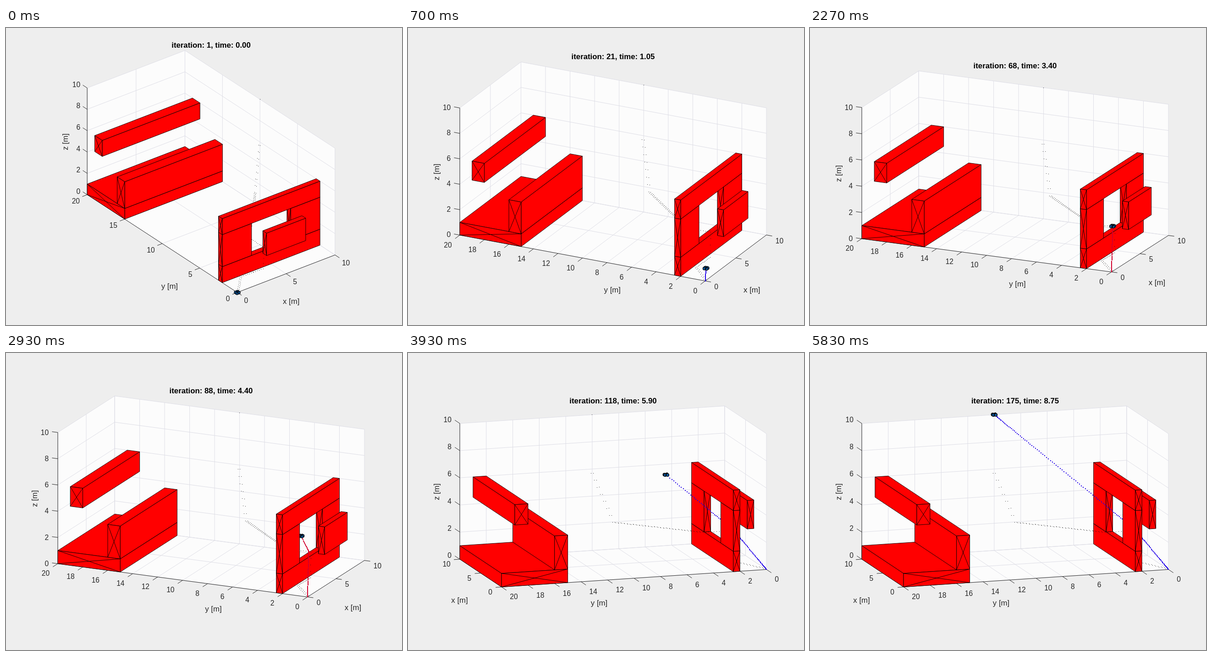
Animation of 864x648 px, one loop 5.86 s. Source, as an HTML page with a canvas:

```html
<!DOCTYPE html>
<html lang="en">
<head>
<meta charset="utf-8">
<title>Flight path</title>
<style>
  html, body { margin: 0; width: 864px; height: 648px; overflow: hidden; background: #eee; }
  canvas { display: block; }
</style>
</head>
<body>
<canvas id="stage" width="864" height="648"></canvas>
<script>
const ctx = document.getElementById('stage').getContext('2d');
const LOOP = 5860;
const FONT = '"Liberation Sans", Arial, sans-serif';
const INK = '#262626';

// step, azimuth, elevation, x label offset, y label offset
const VIEWS = [
  [0, -37.5, 30, 11, 60, 16, 93],
  [15, -37.5, 30, 11, 60, 16, 93],
  [21, -63.5, 22, 35, 69, 65, 69],
  [24, -65.5, 17, 37, 63, 67, 62],
  [91, -65.5, 17, 37, 63, 67, 62],
  [97, -86.5, 16, 66, 0, 90, 50],
  [109, -107.5, 12.1, -46, 59, -76, 54]
];

// x0, x1, y0, y1, z0, z1
const FAR = {
  slab: [0, 10, 15, 20, 0, 1],
  wall: [0, 10, 15, 16, 1, 3.5],
  beam: [0, 10, 18, 19, 4.5, 6]
};
const GATE = [
  [0, 10, 2, 2.5, 0, 1.5],
  [7, 10, 2, 2.5, 1.5, 4.5],
  [0, 3, 2, 2.5, 1.5, 4.5],
  [0, 10, 2, 2.5, 4.5, 6]
];
const PANEL = [3, 7, 0, 0.5, 2.4, 4.5];
const GATE_Y = 2.25;

const START = [0, 0, 0], TURN = [3.4, 1.45, 2.35], GOAL = [10, 10, 10];

// planned route: corner points and the steps leading to each
const ROUTE = [
  [[0, 0, 0], 0], [[1.4, 1.47, 0.26], 8], [[3.8, 1.5, 0.2], 12], [[3.9, 1.5, 2.15], 4],
  [[3.9, 3.54, 2.15], 10], [[8.6, 8.9, 2.28], 30], [[9.95, 10.1, 5.7], 7]
];

const mix = (a, b, u) => a + (b - a) * u;
const mix3 = (a, b, u) => a.map((v, i) => mix(v, b[i], u));
const ease = u => { u = Math.min(1, Math.max(0, u)); return u * u * (3 - 2 * u); };
const range = (end, step) => Array.from({ length: end / step + 1 }, (_, i) => i * step);

const routeDots = [GOAL];
for (let k = 1; k < ROUTE.length; k++) {
  const [to, count] = ROUTE[k], from = ROUTE[k - 1][0];
  for (let i = 0; i < count; i++) {
    const p = mix3(from, to, i / count), q = mix3(from, to, (i + 1) / count);
    routeDots.push([q[0], p[1], q[2]], q);
  }
}

const flight = n => n < 65.7
  ? mix3(START, TURN, ease(n / 63))
  : mix3(TURN, GOAL, ease((n - 65.7) / 108));

function viewAt(n) {
  let i = 0;
  while (i < VIEWS.length - 2 && VIEWS[i + 1][0] <= n) i++;
  const a = VIEWS[i], b = VIEWS[i + 1];
  const u = Math.min(1, (n - a[0]) / (b[0] - a[0]));
  return a.map((v, k) => mix(v, b[k], u));
}

// Orthographic camera that fits the 10 x 20 x 10 volume into the axes area
function camera(az, el) {
  const r = Math.PI / 180;
  const ca = Math.cos(az * r), sa = Math.sin(az * r), ce = Math.cos(el * r), se = Math.sin(el * r);
  const w = 10 * Math.abs(ca) + 20 * Math.abs(sa);
  const h = se * (10 * Math.abs(sa) + 20 * Math.abs(ca)) + 10 * ce;
  const scale = Math.min(669 / w, 528 / h);
  const project = ([x, y, z]) => [
    447.5 + scale * (ca * (x - 5) + sa * (y - 10)),
    313 - scale * (se * (ca * (y - 10) - sa * (x - 5)) + ce * (z - 5))
  ];
  return { project, scale, top: 313 - scale * h / 2 };
}

function trace(cam, pts, close) {
  ctx.beginPath();
  pts.forEach(p => ctx.lineTo(...cam.project(p)));
  if (close) ctx.closePath();
}

function face(cam, pts, fill, edge) {
  trace(cam, pts, true);
  ctx.fillStyle = fill;
  ctx.fill();
  if (edge) { ctx.strokeStyle = edge; ctx.stroke(); }
}

function line(cam, a, b, color) {
  trace(cam, [a, b]);
  ctx.strokeStyle = color;
  ctx.stroke();
}

function text(s, x, y, size, color, align = 'center', turn = 0, weight = '') {
  ctx.save();
  ctx.translate(x, y);
  ctx.rotate(turn);
  ctx.font = `${weight} ${size}px ${FONT}`;
  ctx.fillStyle = color;
  ctx.textAlign = align;
  ctx.fillText(s, 0, size * 0.36);
  ctx.restore();
}

function box(cam, [x0, x1, y0, y1, z0, z1], front) {
  const y = front ? y0 : y1;
  ctx.lineWidth = 0.9;
  const red = pts => face(cam, pts, '#f00', '#000');
  red([[x0, y, z0], [x1, y, z0], [x1, y, z1], [x0, y, z1]]);
  red([[x0, y0, z1], [x1, y0, z1], [x1, y1, z1], [x0, y1, z1]]);
  red([[x0, y0, z0], [x0, y1, z0], [x0, y1, z1], [x0, y0, z1]]);
  line(cam, [x0, y0, z0], [x0, y1, z1], '#000');
  line(cam, [x0, y1, z0], [x0, y0, z1], '#000');
}

function walls(cam, yBack, yStep) {
  const white = '#fcfcfc', grid = '#dedee6';
  face(cam, [[0, 0, 0], [10, 0, 0], [10, 20, 0], [0, 20, 0]], white);
  face(cam, [[10, 0, 0], [10, 20, 0], [10, 20, 10], [10, 0, 10]], white);
  face(cam, [[0, yBack, 0], [10, yBack, 0], [10, yBack, 10], [0, yBack, 10]], white);
  ctx.lineWidth = 1;
  for (const x of range(10, 5)) {
    line(cam, [x, 0, 0], [x, 20, 0], grid);
    line(cam, [x, yBack, 0], [x, yBack, 10], grid);
  }
  for (const y of range(20, yStep)) {
    line(cam, [0, y, 0], [10, y, 0], grid);
    line(cam, [10, y, 0], [10, y, 10], grid);
  }
  for (const z of range(10, 2)) {
    line(cam, [10, 0, z], [10, 20, z], grid);
    line(cam, [0, yBack, z], [10, yBack, z], grid);
  }
}

function axis(cam, values, at, out) {
  const a = cam.project([0, 0, 0]), b = cam.project(out);
  const dx = b[0] - a[0], dy = b[1] - a[1], len = Math.hypot(dx, dy) || 1;
  const ux = dx / len, uy = dy / len, tick = 13 * cam.scale / 30.5;
  const side = Math.abs(ux) > 0.4;
  const gap = side ? (cam.scale - 17) / 1.8 : 2;
  const drop = uy > 0.04 ? 9 + 9 * uy - (30 - cam.scale) * 0.8 : 2 + 6 * uy;
  ctx.lineWidth = 1;
  line(cam, at(values[0]), at(values[values.length - 1]), INK);
  for (const v of values) {
    const [x, y] = cam.project(at(v));
    const ex = x + ux * tick, ey = y + uy * tick;
    ctx.beginPath();
    ctx.moveTo(x, y);
    ctx.lineTo(ex, ey);
    ctx.stroke();
    text(v, ex + Math.sign(ux) * gap, ey + drop, 15.6, INK, !side ? 'center' : ux > 0 ? 'left' : 'right');
  }
}

function axes(cam, view, front, yStep) {
  const [, az, , xlx, xly, ylx, yly] = view;
  const yx = front ? 0 : 20, zx = front ? 0 : 10;
  axis(cam, range(10, 5), v => [v, yx, 0], [0, front ? -1 : 1, 0]);
  axis(cam, range(20, yStep), v => [0, v, 0], [-1, 0, 0]);
  axis(cam, range(10, 2), v => [zx, 20, v], front ? [0, 1, 0] : [1, 0, 0]);

  const upright = az < -82 && az > -97;
  const off = upright ? [front ? 66 : -66, 0] : front ? [xlx, xly] : [-46, 59];
  const mx = cam.project([5, yx, 0]), my = cam.project([0, 10, 0]), mz = cam.project([zx, 20, 5]);
  text('x [m]', mx[0] + off[0], mx[1] + off[1], 16.8, INK, 'center', upright ? -Math.PI / 2 : 0);
  text('y [m]', my[0] + ylx, my[1] + yly, 16.8, INK);
  text('z [m]', mz[0] - 21 - cam.scale, mz[1] + 1, 16.8, INK, 'center', -Math.PI / 2);
}

function dots(cam, pts, size, color) {
  ctx.fillStyle = color;
  for (const p of pts) {
    const [x, y] = cam.project(p);
    ctx.fillRect(Math.round(x - size / 2), Math.round(y - size / 2), size, size);
  }
}

function drone(cam, [x, y, z]) {
  ctx.lineWidth = 1.3;
  ctx.strokeStyle = '#000';
  ctx.fillStyle = '#0b5ca4';
  for (const [i, j] of [[1, 1], [1, -1], [-1, 1], [-1, -1]]) {
    const [px, py] = cam.project([x + i * 0.09, y + j * 0.09, z]);
    ctx.beginPath();
    ctx.arc(px, py, 3.2, 0, 2 * Math.PI);
    ctx.fill();
    ctx.stroke();
  }
  const [cx, cy] = cam.project([x, y, z]);
  ctx.beginPath();
  ctx.moveTo(cx - 1, cy + 3);
  ctx.lineTo(cx + 3, cy - 5);
  ctx.stroke();
}

function draw(n) {
  const view = viewAt(n), [, az, el] = view;
  const cam = camera(az, el), front = az > -90;
  const a = cam.project(START), b = cam.project([0, 20, 0]);
  const yStep = Math.hypot(b[0] - a[0], b[1] - a[1]) > 470 ? 2 : 5;
  const here = flight(n);
  const trail = Array.from({ length: n + 1 }, (_, i) => flight(i));
  const trailColor = n >= 55 && n < 91 ? '#d0002c' : '#2000e8';

  const solid = shape => box(cam, shape, front);
  const paths = near => {
    const keep = p => (p[1] < GATE_Y) === near;
    dots(cam, routeDots.filter(keep), 1, '#111');
    dots(cam, trail.filter(keep), 2, trailColor);
    if (keep(here)) drone(cam, here);
  };
  const gate = () => GATE.forEach(solid);

  ctx.fillStyle = '#eee';
  ctx.fillRect(0, 0, 864, 648);
  ctx.lineJoin = 'round';
  walls(cam, front ? 20 : 0, yStep);
  axes(cam, view, front, yStep);

  if (front) {
    [FAR.slab, FAR.beam, FAR.wall].forEach(solid);
    paths(false);
    gate();
    solid(PANEL);
    paths(true);
  } else {
    solid(PANEL);
    paths(true);
    gate();
    paths(false);
    [FAR.slab, FAR.wall, FAR.beam].forEach(solid);
  }

  text(`iteration: ${Math.max(1, n)}, time: ${(n * 0.05).toFixed(2)}`,
    447.5, cam.top - 11.7, 16.8, '#000', 'center', 0, 'bold');
}

const begin = performance.now();
let shown = -1;
function tick() {
  const t = Math.max(0, performance.now() - begin) % LOOP;
  const n = Math.min(175, Math.floor((Math.floor(t / 10) * 10 + 3.4) * 0.03));
  if (n !== shown) draw(shown = n);
  requestAnimationFrame(tick);
}
tick();
</script>
</body>
</html>
```
